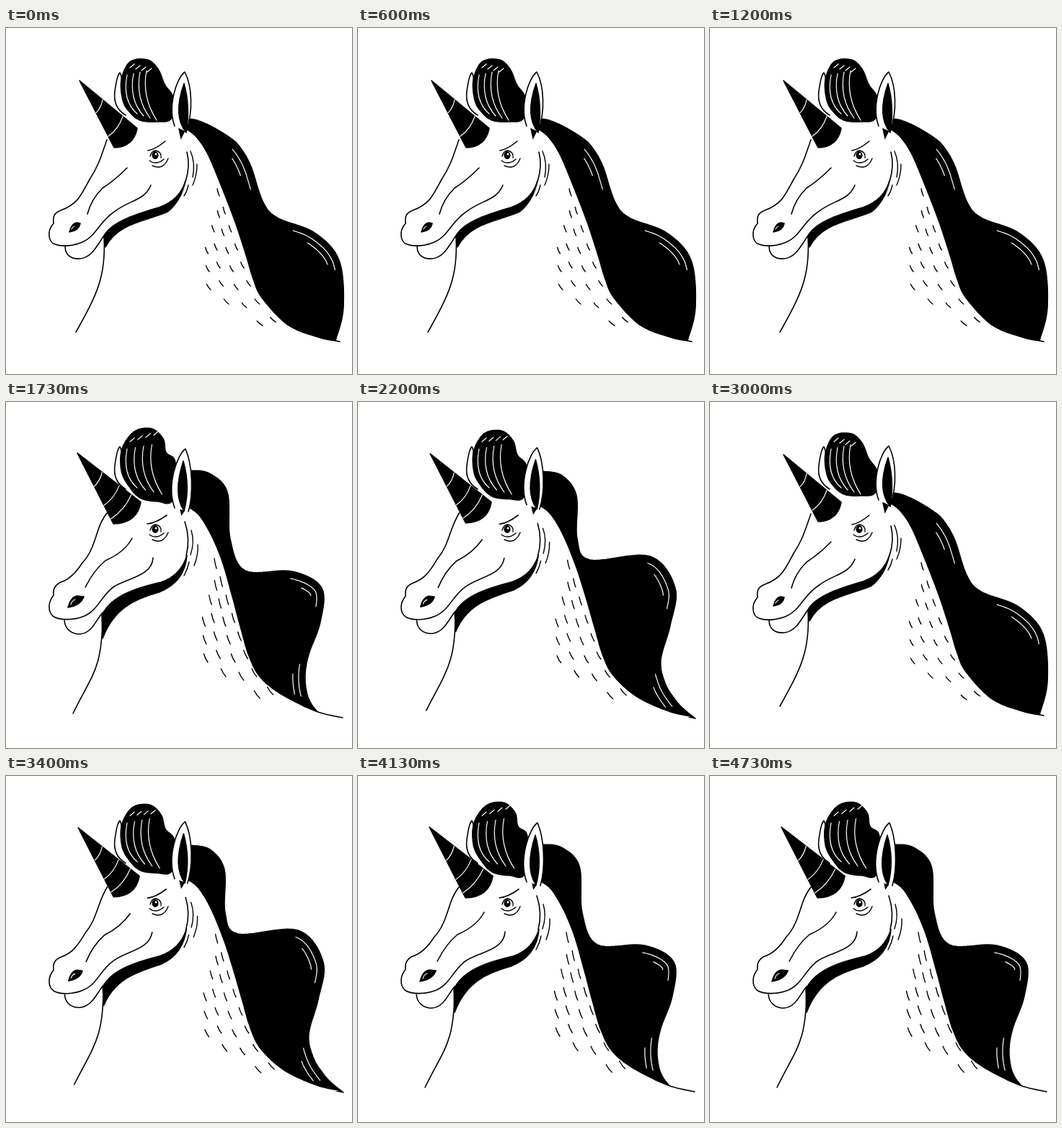
An HTML page for the animation above (4790 ms loop, 480 by 480 pixels).

```html
<!DOCTYPE html>
<html lang="en">
<head>
<meta charset="utf-8">
<title>Unicorn</title>
<style>
  html, body { margin: 0; width: 100%; height: 100%; overflow: hidden; background: #fff; }
  svg { display: block; width: 100vw; height: 100vh; }
  path { fill: none; stroke: #000; stroke-width: 1.6; stroke-linecap: round; stroke-linejoin: round; }
  .ink { fill: #000; }
  .paper { fill: #fff; }
  .blank { fill: #fff; stroke: none; }
  .light { stroke: #fff; stroke-width: 1.2; }
  .thin { stroke-width: 1.4; }
</style>
</head>
<body>
<svg id="stage" viewBox="0 0 480 480"></svg>
<script>
const LOOP = 4790, STEP = 200 / 3, COUNT = 9;

// Key points of the mane's outer edge: root, crest, dip, crest, tip.
const MANE = {
  0: '254 126 265 128 280 134 293 141 306 149 322 162 339 190 356 240 376 263 428 284 462 322 468 388 457 434',
  4: '256 128 264 143 284 161 305 163 332 165 362 178 384 208 389 262 406 310 440 320 472 358 471 408 452 434',
  6: '256 96 283 102 303 130 304 190 322 219 405 214 440 258 433 310 420 358 426 390 440 413 453 427 468 439',
  8: '255 95 282 99 307 125 311 190 332 234 397 235 438 258 436 305 420 350 415 378 417 402 423 418 433 431'
};

// Other parts come as a rest pose and a leaning (or puffed) pose.
const NECK = [
  '250 140 264 151 281 177 305 235 320 275 333 315 343 348 355 374 390 411 430 428 463 435',
  '252 145 268 157 285 185 300 221 313 266 325 311 337 352 353 382 383 406 430 429 467 438'];

const FORELOCK = [
  '162 100 160 72 172 47 196 44 211 57 220 78 232 97 229 126 208 130 186 128 171 116',
  '160 95 161 65 178 41 202 37 218 51 222 70 235 84 231 136 210 138 186 133 170 116'];

const HORN = ['102 73 182 139 150 166', '99 71 187 139 149 169'];

const FACE = [
  // forehead, muzzle and mouth
  ['',
    'M140 155C132 178 128 192 116 210C104 232 100 244 76 253C66 257 65 262 66 271C56 282 59 297 68 300C78 304 95 302 106 297C126 288 128 270 150 255C172 238 192 240 201 218',
    'M141 153C124 172 126 202 106 223C95 240 86 247 76 250C67 254 65 260 66 268C58 278 58 290 65 297C75 304 95 302 106 298C128 290 132 268 150 256C170 244 203 241 204 216'],
  // nose crease, lower lip, chest
  ['', 'M113 258Q118 238 134 222Q150 212 168 194', 'M110 257Q122 233 138 220Q165 208 175 189'],
  ['', 'M82 303C82 316 92 321 103 320C120 318 127 300 136 288', 'M81 303C82 316 92 322 102 322C119 321 124 304 134 292'],
  ['', 'M136 290C139 345 126 370 97 422', 'M134 294C134 372 119 378 93 432'],
  // jaw shadow
  ['ink',
    'M136 288C147 268 185 257 212 249Q241 239 249 212Q243 240 224 255C195 268 155 270 138 304Z',
    'M133 296C146 266 190 256 215 250Q242 241 251 213Q248 250 212 264C180 273 150 285 134 328Z'],
  // nostril
  ['ink', 'M88 283Q91 271 98 270L103 271Q101 281 88 283Z', 'M86 285Q90 270 99 269L108 270Q104 282 86 285Z'],
  ['light', 'M91 279Q92 276 95 275', 'M90 281Q91 276 96 274'],
  // cheek
  ['', 'M251 172Q256 192 249 213', 'M248 166Q256 190 250 213'],
  ['thin', 'M256 171Q263 187 259 207M265 189Q265 204 259 218M253 218Q251 227 247 233',
    'M257 178Q262 194 256 212M266 198Q267 212 261 227M254 222Q252 232 247 241'],
  // brow and bags
  ['', 'M197 170Q208 168 221 157', 'M196 169Q208 168 223 157'],
  ['thin', 'M200 178Q202 170 208 170Q216 172 215 180M199 184Q208 191 219 182M203 191Q218 198 225 181']
];

const LEFT_EAR = ['paper', 'M166 121Q148 110 151 88Q154 65 158 62Q162 68 160 85'];
const EAR = ['paper', 'M234 136C224 110 236 70 248 61C258 80 260 115 250 144',
  'M234 147C222 115 238 72 249 65C259 88 260 128 253 152'];
const EAR_HOLE = ['ink', 'M247 77Q231 122 250 145Q256 110 247 77Z', 'M246 82Q231 128 247 151Q256 118 246 82Z'];

const nums = s => s.match(/[\d.]+/g).map(Number);

// Blend every number in two strings of the same shape.
function mix(a, b, k) {
  const to = nums(b);
  let i = 0;
  return a.replace(/[\d.]+/g, v => +(+v + (to[i++] - v) * k).toFixed(2));
}

function pair(s) {
  const n = nums(s);
  return Array.from({ length: n.length / 2 }, (_, i) => [n[2 * i], n[2 * i + 1]]);
}

// Catmull-Rom position at u, counted in points.
function along(pts, u, closed) {
  const n = pts.length;
  const i = closed ? Math.floor(u) : Math.max(0, Math.min(n - 2, Math.floor(u)));
  const t = u - i;
  const at = j => pts[closed ? (j + n) % n : Math.max(0, Math.min(n - 1, j))];
  const [a, b, c, d] = [at(i - 1), at(i), at(i + 1), at(i + 2)];
  return [0, 1].map(j => b[j] + t / 2 * (c[j] - a[j]
    + t * (2 * a[j] - 5 * b[j] + 4 * c[j] - d[j] + t * (3 * (b[j] - c[j]) + d[j] - a[j]))));
}

// Curve from u = from to u = to, moved inward by inset.
function curve(pts, { closed = false, from = 0, to = pts.length - !closed, inset = 0 } = {}) {
  const steps = Math.ceil((to - from) * 10);
  const out = [];
  for (let i = 0; i <= steps; i++) {
    const u = from + (to - from) * i / steps;
    const [x, y] = along(pts, u, closed);
    const [p, q] = [along(pts, u - .01, closed), along(pts, u + .01, closed)];
    const dx = q[0] - p[0], dy = q[1] - p[1], k = inset / (Math.hypot(dx, dy) || 1);
    out.push(`${(x - dy * k).toFixed(1)} ${(y + dx * k).toFixed(1)}`);
  }
  return 'M' + out.join('L');
}

const path = (cls, d) => `<path class="${cls}" d="${d}"/>`;

function mane(s) {
  const keys = Object.keys(MANE).map(Number);
  const a = Math.max(...keys.filter(k => k <= s)), b = Math.min(...keys.filter(k => k >= s));
  const edge = pair(mix(MANE[a], MANE[b], (s - a) / (b - a || 1)));
  const shine = [[5, 6.6, 10], [5.4, 6.2, 18], [8.5, 10.2, 9], [9, 10, 17]];
  return path('ink', curve(edge) + 'L300 400L240 140Z')
    + path('light', shine.map(([from, to, inset]) => curve(edge, { from, to, inset })).join(''));
}

// Short hairs in rows down the neck, spreading towards the shoulder.
function fur(k) {
  let d = '';
  for (let row = 0; row < 8; row++) {
    const gap = 7 + 2.4 * row, dx = 3 + row * row / 10, dy = 10 + 4 * k - row * .5;
    for (let c = 0; c < Math.min(row + 1, 4, 9 - row); c++) {
      const y = 217 + 25.5 * row + 5 * (c % 2);
      const edge = 298 + .32 * (y - 217) + .008 * Math.max(0, y - 350) ** 2;
      d += `M${edge - 9 - gap * c + 4 * (1 - k)} ${y + 6 * (1 - k)}q${dx * .4} ${dy * .6} ${dx} ${dy}`;
    }
  }
  return path('thin', d);
}

function forelock(puff) {
  let d = '';
  for (let i = 0; i < 4; i++) {
    const x = 168 + (9 + 2.5 * puff) * i, y = 65 - 2 * i;
    d += `M${x} ${y}Q${x - 7} ${y + 36} ${x + 14} ${119 + 3 * i}`;
    d += `M${172 + (8 + 3 * puff) * i} ${55 + (2 - 5 * puff) * i}l6 -5`;
  }
  return path('ink', curve(pair(mix(...FORELOCK, puff)), { closed: true })) + path('light', d);
}

function horn(k) {
  const [tip, right, left] = pair(mix(...HORN, k));
  const cuts = k < .5 ? [.48, .83] : [.47, .74, .93];
  const down = (p, f) => tip.map((v, j) => v + (p[j] - v) * f);
  const rings = cuts.map(f => {
    const a = down(left, f), b = down(right, f - .08);
    return `M${a}Q${(a[0] + b[0]) / 2 + 5 * f} ${(a[1] + b[1]) / 2 + 5 * f} ${b}`;
  });
  return path('ink', `M${tip}L${right}Q${right[0] - 5} ${left[1] - 1} ${left}Z`) + path('light', rings.join(''));
}

function pose(s) {
  const lean = s < 4 ? s / 4 : .6 + .2 * Math.abs(s - 6);
  const puff = (s / 8) ** 2;
  const part = ([cls, a, b = a]) => path(cls, mix(a, b, lean));
  const neck = curve(pair(mix(...NECK, lean)));

  return [
    mane(s),
    path('blank', neck + 'L300 445L150 330L235 170Z'),
    path('', neck),
    fur(lean),
    part(LEFT_EAR),
    ...FACE.map(part),
    '<ellipse cx="207" cy="176.5" rx="4.6" ry="5.4"/><circle cx="208" cy="175" r="1.5" fill="#fff"/>',
    forelock(puff),
    part(EAR), part(EAR_HOLE),
    horn(lean)
  ].join('');
}

const stage = document.getElementById('stage');
stage.innerHTML = Array.from({ length: COUNT }, (_, s) => `<g display="none">${pose(s)}</g>`).join('');
const poses = [...stage.children];
const start = performance.now();
let shown = -1;

function draw(now) {
  const t = Math.max(0, now - start) % LOOP;
  const s = Math.floor((t + 4) / STEP) % COUNT;
  if (s !== shown) {
    poses.forEach((g, i) => g.setAttribute('display', i === s ? 'inline' : 'none'));
    shown = s;
  }
  requestAnimationFrame(draw);
}
draw(start);
</script>
</body>
</html>
```
